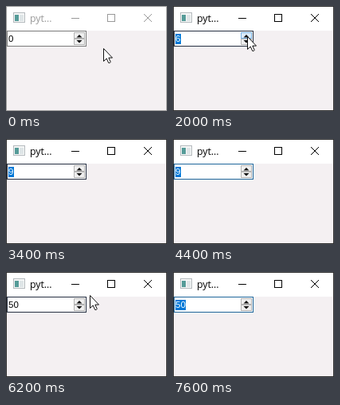
These frames come from a looping animation (202x132 px, 8000 ms). An HTML page:

```html
<!DOCTYPE html>
<html lang="en">
<head>
<meta charset="utf-8">
<title>Spin box</title>
<style>
  html, body { margin: 0; width: 100%; height: 100%; overflow: hidden; background: #fff; }
  svg { display: block; }
  .crisp { shape-rendering: crispEdges; }
  .title { font: 12.3px "Open Sans", "Noto Sans", sans-serif; }
  #value { font: 11.5px "Liberation Sans", Arial, sans-serif; }
</style>
</head>
<body>
<svg width="202" height="132" viewBox="0 0 202 132">
  <rect width="202" height="132" fill="#fff"/>
  <rect class="crisp" y="31" width="202" height="101" fill="#f4f0f2"/>

  <!-- title bar -->
  <g class="crisp">
    <rect x="9.5" y="8.5" width="14" height="12" fill="#f6f7f7" stroke="#b4babd"/>
    <rect x="11" y="11" width="5" height="8" fill="#559b98"/>
    <rect x="17" y="11" width="5" height="8" fill="#dfe5e7"/>
  </g>
  <g id="caption">
    <text class="title" x="30" y="20" fill="currentColor">pyt...</text>
    <path class="crisp" d="M82 15.5h10M127.5 10.5h9v9h-9z" fill="none" stroke="currentColor"/>
    <path d="M173 10l10 10M183 10l-10 10" stroke="currentColor"/>
  </g>

  <!-- spin box -->
  <g class="crisp">
    <rect id="box" x="1.5" y="31.5" width="99" height="19" fill="#fff"/>
    <rect id="up" x="85.5" y="33.5" width="13" height="7"/>
    <rect x="85.5" y="41.5" width="13" height="7" fill="#f0f0f0" stroke="#b4b4b4"/>
    <rect id="mark" x="3" y="35" height="13" fill="#0078d7"/>
  </g>
  <path d="M88.5 39.5l3.5-3.5 3.5 3.5zM88.5 43l3.5 3.5 3.5-3.5z" fill="#111"/>
  <text id="value" x="3" y="45"></text>

  <rect id="frame" class="crisp" x=".5" y=".5" width="201" height="131" fill="none"/>
  <path id="arrow" d="M.5 .5v16l3.7-3.5 2.5 5.5h1.6l.9-1.2-2.4-5.2h4.7z" fill="#fff" stroke="#111"/>
  <path id="beam" class="crisp" d="M-3 -7.5h3m1 0h3M.5 -7v14M-3 7.5h3m1 0h3" fill="none" stroke="#111"/>
</svg>
<script>
const LOOP = 8000, STEP = 200;
const IDLE = [122, 122, 122], HOT = [38, 48, 66], FOCUS = [30, 102, 155];

const $ = id => document.getElementById(id);
const set = (id, attrs) => {
  for (const name in attrs) $(id).setAttribute(name, attrs[name]);
};
const clamp = (v, low, high) => Math.min(high, Math.max(low, v));
const ramp = (t, from, to) => clamp((t - from) / (to - from), 0, 1);
const mix = (a, b, f) => a.map((v, i) => Math.round(v + (b[i] - v) * f));

// Pointer position, or null while it is off the stage.
function pointer(t) {
  const start = [122, 53], button = [93, 38], far = [114, 27];
  if (t < 2400) return mix(start, button, ramp(t, 0, 800));
  if (t < 3400) return mix(button, [0, 41], ramp(t, 2400, 3400));
  if (t < 5400 || t >= 7200) return null;
  if (t < 5800) return mix([20, 41], far, ramp(t, 5400, 5800));
  return mix(far, [6, 47], ramp(t, 5800, 7200) ** 2);
}

function borderColor(t) {
  const focus = ramp(t, 3400, 4000) - ramp(t, 5200, 5600) + ramp(t, 7000, 7600);
  return mix(mix(IDLE, HOT, ramp(t, 600, 800)), FOCUS, focus);
}

// Three clicks add 3 each; 50 is typed later.
function boxValue(t) {
  return t < 4800 ? 3 * clamp(Math.floor((t - 600) / 600), 0, 3) : 50;
}

function draw(t) {
  const active = t >= 1200;
  $("caption").style.color = active ? "#000" : "#999";
  set("frame", { stroke: active ? "#303030" : "#999" });
  set("box", { stroke: `rgb(${borderColor(t)})` });

  const text = String(boxValue(t));
  const selected = active && t < 4800 || t >= 7200;
  $("value").textContent = text;
  set("value", { fill: selected ? "#fff" : "#000" });
  set("mark", { width: selected ? 1 + 6 * text.length : 0 });

  const spot = pointer(t);
  const [x, y] = spot || [-50, -50];
  const overText = x < 84 && y > 31 && y < 50;
  const overUp = x >= 85 && x < 99 && y >= 33 && y < 41;
  set("up", { fill: overUp ? "#dcebf8" : "#f0f0f0", stroke: overUp ? "#78b2e4" : "#b4b4b4" });
  for (const id of ["arrow", "beam"])
    set(id, {
      transform: `translate(${x} ${y})`,
      visibility: spot && overText === (id === "beam") ? "visible" : "hidden"
    });
}

const start = performance.now();
function tick() {
  const t = (performance.now() - start) % LOOP;
  draw(Math.floor(t / STEP) * STEP);
  requestAnimationFrame(tick);
}
tick();
</script>
</body>
</html>
```
